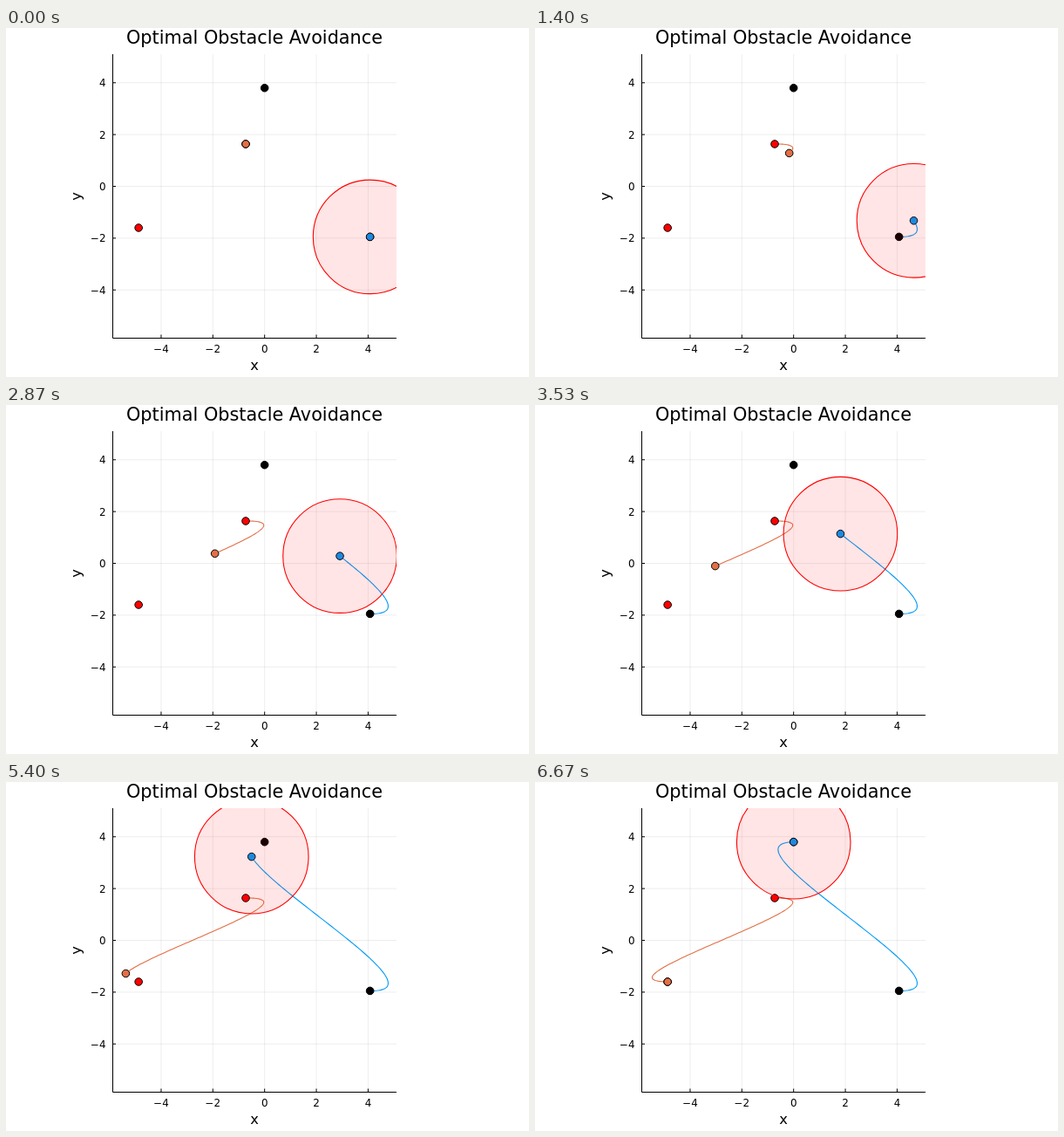
Write an HTML page that moves like this. It is 600x400 px and loops after 6.74 s.

```html
<!DOCTYPE html>
<html lang="en">
<head>
<meta charset="utf-8">
<title>Optimal Obstacle Avoidance</title>
<style>
  html, body { margin: 0; width: 100%; height: 100%; overflow: hidden; background: #fff; }
  svg { display: block; width: 600px; height: 400px; }
  text { font-family: "DejaVu Sans", sans-serif; font-size: 11.9px; text-anchor: middle; }
  .title { font-size: 20.8px; }
  .label { font-size: 16.3px; }
  .grid { stroke: #000; stroke-opacity: .1; stroke-width: .7; }
  .axis { stroke: #000; fill: none; }
  .trail { fill: none; stroke-width: 1.1; stroke-linejoin: round; }
  .dot { stroke: #000; stroke-width: 1; }
  .zone { fill: red; fill-opacity: .1; stroke: red; stroke-width: 1.1; }
</style>
</head>
<body>
<svg viewBox="0 0 600 400">
  <clipPath id="area"><rect x="122" y="30" width="326" height="326"/></clipPath>
  <g id="axes"></g>
  <g id="scene" clip-path="url(#area)"></g>
  <text class="title" x="285" y="18.4">Optimal Obstacle Avoidance</text>
  <text class="label" x="285" y="391.7">x</text>
  <text class="label" transform="translate(86 193) rotate(-90)">y</text>
</svg>
<script>
const LOOP = 6740, STEPS = 100, SCALE = 29.68;
const axes = document.getElementById('axes');
const scene = document.getElementById('scene');
const px = x => 296.7 + SCALE * x;
const py = y => 181.5 - SCALE * y;

function add(parent, tag, attrs, text = '') {
  const node = document.createElementNS('http://www.w3.org/2000/svg', tag);
  for (const key in attrs) node.setAttribute(key, attrs[key]);
  node.textContent = text;
  parent.append(node);
  return node;
}

for (const value of [-4, -2, 0, 2, 4]) {
  const x = px(value), y = py(value);
  const name = String(value).replace('-', '\u2212');
  add(axes, 'path', { class: 'grid', d: `M${x} 30V355M123 ${y}H448` });
  add(axes, 'path', { class: 'axis', d: `M${x} 355v-3.5M123 ${y}h3` });
  add(axes, 'text', { x, y: 371.7 }, name);
  add(axes, 'text', { x: 114.6, y: y + 4.4, style: 'text-anchor:end' }, name);
}
add(axes, 'path', { class: 'axis', d: 'M122.5 30V355.5H448' });

// Minimum-energy path of a forward-Euler double integrator,
// with the same velocity at both ends.
function coordinate(from, to, travel, s) {
  const shift = 6 * (to - from - travel) / (2 * STEPS);
  return from + (to - from) * s * s * (3 - 2 * s)
    + (travel - shift) * s * (1 - s) ** 2
    + (travel + shift) * s * s * (s - 1);
}

function makePath(from, to) {
  return Array.from({ length: STEPS + 1 }, (_, i) => {
    const s = i / STEPS;
    return [px(coordinate(from[0], to[0], 10, s)), py(coordinate(from[1], to[1], 0, s))];
  });
}

const agents = [
  { from: [4.075, -1.95], to: [0, 3.8], color: '#009afa', ends: '#000' },
  { from: [-0.73, 1.635], to: [-4.87, -1.6], color: '#e36f47', ends: 'red' }
];

const addDot = (fill, [cx, cy] = [0, 0]) =>
  add(scene, 'circle', { class: 'dot', r: 4.3, fill, cx, cy });

for (const agent of agents) {
  agent.path = makePath(agent.from, agent.to);
  agent.trail = add(scene, 'path', { class: 'trail', stroke: agent.color });
}
for (const { path, ends } of agents) {
  addDot(ends, path[0]);
  addDot(ends, path[STEPS]);
}
for (const agent of agents) agent.dot = addDot(agent.color);
const zone = add(scene, 'circle', { class: 'zone', r: 2.2 * SCALE });

function moveTo(circle, [x, y]) {
  circle.setAttribute('cx', x);
  circle.setAttribute('cy', y);
}

function draw(now) {
  // 15 steps per second, each starting on a whole hundredth of a second.
  const hundredths = Math.floor((now % LOOP) / 10);
  const step = Math.min(STEPS, Math.floor((hundredths + 0.5) * 0.15));
  for (const { path, trail, dot } of agents) {
    trail.setAttribute('d', 'M' + path.slice(0, step + 1).join('L'));
    moveTo(dot, path[step]);
  }
  moveTo(zone, agents[0].path[step]);
}

let start;
function tick(now) {
  start ??= now;
  draw(now - start);
  requestAnimationFrame(tick);
}
draw(0);
requestAnimationFrame(tick);
</script>
</body>
</html>
```
